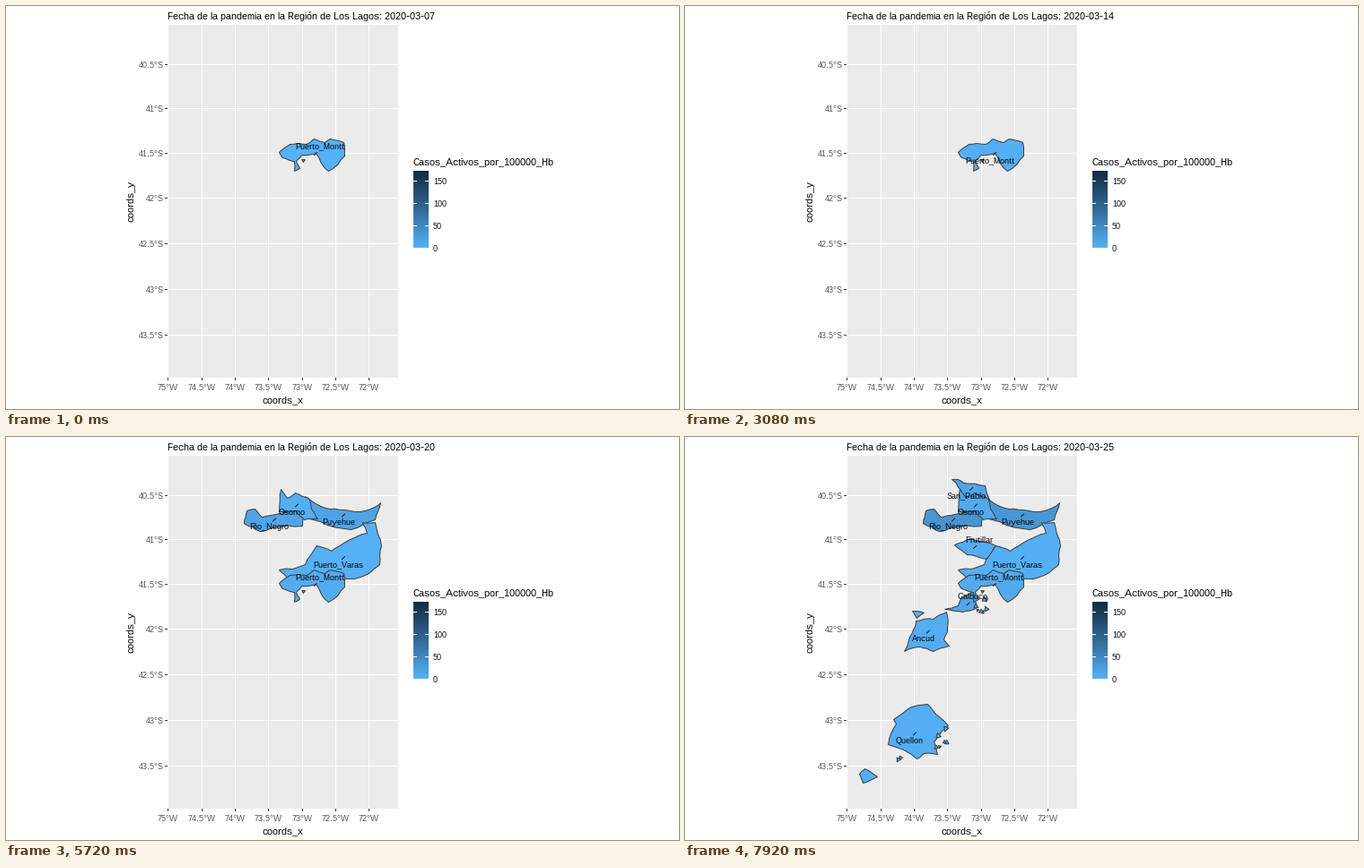
Recreate the animation shown at these times as a matplotlib script. Size 750 by 450 pixels, loop 8000 ms.

```python
import numpy as np
import matplotlib
import matplotlib.pyplot as plt
from matplotlib.animation import FuncAnimation
from matplotlib.colors import LinearSegmentedColormap
from matplotlib.patches import Polygon, Rectangle

matplotlib.rcParams.update({
    "font.family": "Liberation Sans",
    "text.hinting": "native",
    "text.hinting_factor": 1,
})

W, H, DPI = 750, 450, 100
STEP, DAY, LOOP = 40, 440, 8000
MAX_RATE = 172
LEFT, TOP, RIGHT, BOTTOM = 180, 21, 437, 415
SCALE = 74.75  # pixels per degree of longitude
GREY_TEXT, TICK, OUTLINE = "#4D4D4D", "#333333", "#3C3C3C"
RAMP = LinearSegmentedColormap.from_list(
    "rate", ["#56B1F7", "#326A97", "#132B43"])

rng = np.random.default_rng(7)
fig = plt.figure(figsize=(W / DPI, H / DPI), dpi=DPI, facecolor="white")
ax = fig.add_axes([0, 0, 1, 1])


def text(x, y, s, px=9, color="black", **kw):
    """Text with its baseline at the lower edge of pixel row y."""
    return ax.text(x - 0.5, y - 0.5, s, fontsize=px * 0.72 + 0.01,
                   color=color, va=kw.pop("va", "baseline"), **kw)


def box(x, y, w, h, color, z=1):
    """Rectangle covering whole pixels."""
    ax.add_patch(Rectangle((x - 0.5, y - 0.5), w, h, fc=color, lw=0,
                           antialiased=False, zorder=z))


def mercator(lat):
    return np.degrees(np.log(np.tan(np.pi / 4 + np.radians(lat) / 2)))


# Panel, graticule and axes
box(LEFT, TOP, RIGHT - LEFT, BOTTOM - TOP, "#EBEBEB")
for lon in np.arange(75, 71.9, -0.5):
    x = round(180.2 + SCALE * (75 - lon))
    box(x, TOP, 1, BOTTOM - TOP, "white", 2)
    box(x, BOTTOM, 1, 3, TICK, 2)
    text(x + 0.5, 429, f"{lon:g}°W", color=GREY_TEXT, ha="center")
for lat in np.arange(40.5, 43.6, 0.5):
    y = round(65.05 + SCALE * (mercator(lat) - mercator(40.5)))
    box(LEFT, y, RIGHT - LEFT, 1, "white", 2)
    box(LEFT - 3, y, 3, 1, TICK, 2)
    text(176, y + 4, f"{lat:g}°S", color=GREY_TEXT, ha="right")
text(308.5, 443, "coords_x", 11, ha="center")
text(144, 218, "coords_y", 11, rotation=90, ha="right", va="center")
title = text(180, 15, "", 11)

# Colour bar
text(453, 178, "Casos_Activos_por_100000_Hb", 11)
ax.imshow(RAMP(np.linspace(1, 0, 86))[:, None], aspect="auto", zorder=2,
          extent=(453.5, 470.5, 269.5, 183.5), interpolation="nearest")
for rate in range(0, 151, 50):
    y = round(269.6 - rate * 0.497)
    for x in (454, 467):
        box(x, y, 4, 1, "white", 3)
    text(476, y + 4, str(rate))


def coast(points, levels=2, bend=0.07):
    """Turn a few key points into a ragged outline by midpoint shifts."""
    p = np.array(points, float)
    for _ in range(levels):
        side = np.roll(p, -1, axis=0) - p
        normal = side[:, ::-1] * (1, -1)
        shift = rng.uniform(-bend, bend, (len(p), 1))
        p = np.stack([p, p + side / 2 + normal * shift], 1).reshape(-1, 2)
    return p


def islets(centre, spread, count):
    """Small ragged islands strewn around a centre."""
    turn = np.arange(3) * 2 * np.pi / 3
    for _ in range(count):
        x, y = rng.uniform(-1, 1, 2) * spread + centre
        r, a = rng.uniform(1.5, 3.5), rng.uniform(0, np.pi)
        yield np.c_[x + r * np.cos(turn + a), y + r * np.sin(turn + a)]


# Label side for each day: up or low
OFFSETS = {"U": (5, -5), "L": (-5.5, 11)}
NORTH = "U" * 11 + "UULLUULL"
MIDDLE = "L" * 15 + "UULL"
SOUTH = "ULLLUULLUULUUUUULUU"


class Region:
    def __init__(self, name, centre, start, sides, rate, slope, *shapes):
        self.centre, self.start, self.sides = centre, start, sides
        self.rate, self.slope = rate, slope
        self.patches = [
            ax.add_patch(Polygon(coast(s), ec=OUTLINE, lw=0.72, zorder=4))
            for s in shapes]
        x, y = centre
        self.lead, = ax.plot([x - 1.5, x + 1.5], [y + 1.5, y - 1.5],
                             color="black", lw=0.6, zorder=5)
        self.label = text(x, y, name, ha="center", zorder=6)

    def show(self, day):
        alive = day >= self.start
        for artist in (*self.patches, self.lead, self.label):
            artist.set_visible(alive)
        fill = RAMP((self.rate + self.slope * (day - self.start)) / MAX_RATE)
        for patch in self.patches:
            patch.set_facecolor(fill)
        offset = OFFSETS[self.sides[day]]
        self.label.set_position(np.add(self.centre, offset) - (0, 0.5))


# Later regions cover earlier ones, so shared borders are given once
regions = [
    Region("San_Pablo", (318.5, 57.5), 15, NORTH, 10, 2,
           [(297, 47), (304, 47), (310, 51), (334, 54), (339, 70),
            (312, 72), (306, 58)]),
    Region("Puyehue", (375.5, 87), 12, NORTH, 13, 3,
           [(333, 66), (356, 79), (376, 81), (400, 82), (417, 73),
            (411, 92), (384, 103), (350, 94), (336, 90)]),
    Region("Rio_Negro", (298.5, 92), 11, NORTH, 8, 3.8,
           [(265, 96), (268, 82), (277, 80), (285, 89), (300, 86),
            (322, 78), (331, 88), (330, 99), (297, 101), (283, 105)]),
    Region("Osorno", (323.5, 76), 11, NORTH, 2, 1.2,
           [(306, 58), (313, 68), (322, 62), (337, 68), (340, 80),
            (347, 91), (332, 92), (323, 82), (304, 83)]),
    Region("Frutillar", (322.5, 122.5), 14, SOUTH, 4, 0.5,
           [(300, 120), (318, 113), (346, 121), (336, 136), (314, 131)]),
    Region("Puerto_Varas", (375.5, 134.5), 11, MIDDLE, 1, 0.3,
           [(304, 148), (333, 142), (346, 121), (362, 127), (381, 115),
            (402, 107), (397, 95), (411, 95), (418, 121), (416, 142),
            (404, 152), (382, 158), (350, 158), (313, 157)]),
    Region("Calbuco", (315, 186), 16, SOUTH, 9, 2,
           [(289, 192), (304, 188), (308, 178), (320, 172), (325, 190),
            (309, 195)],
           *islets((330, 191), (7, 13), 8)),
    Region("Puerto_Montt", (344.5, 164.5), 0, SOUTH, 0, 0.5,
           [(304, 163), (316, 154), (334, 154), (343, 148), (355, 152),
            (361, 148), (376, 152), (377, 167), (359, 184), (345, 164),
            (329, 166), (323, 173), (327, 181), (321, 184), (321, 173),
            (308, 169)],
           *islets((331, 172), (0, 0), 1)),
    Region("Ancud", (270.5, 217), 17, NORTH, 5, 1,
           [(257, 205), (276, 203), (291, 195), (292, 217), (288, 226),
            (294, 233), (276, 239), (262, 234), (244, 239), (253, 218)],
           [(253, 194), (266, 196), (258, 202)]),
    Region("Quellon", (255.5, 331), 16, NORTH, 3, 0.5,
           [(250, 302), (270, 298), (283, 312), (293, 322), (284, 331),
            (277, 340), (281, 354), (266, 353), (258, 359), (226, 343),
            (235, 320), (232, 315)],
           [(194, 376), (200, 370), (214, 379), (198, 386)],
           *islets((286, 334), (8, 13), 6),
           *islets((238, 358), (2, 3), 2)),
]

ax.set_xlim(-0.5, W - 0.5)
ax.set_ylim(H - 0.5, -0.5)
ax.axis("off")


def draw(i):
    day = i * STEP // DAY
    title.set_text("Fecha de la pandemia en la Región de Los Lagos: "
                   f"2020-03-{7 + day:02d}")
    for region in regions:
        region.show(day)
    return []


anim = FuncAnimation(fig, draw, frames=LOOP // STEP, interval=STEP,
                     init_func=lambda: draw(0), repeat=True, repeat_delay=0)
plt.show()
```
